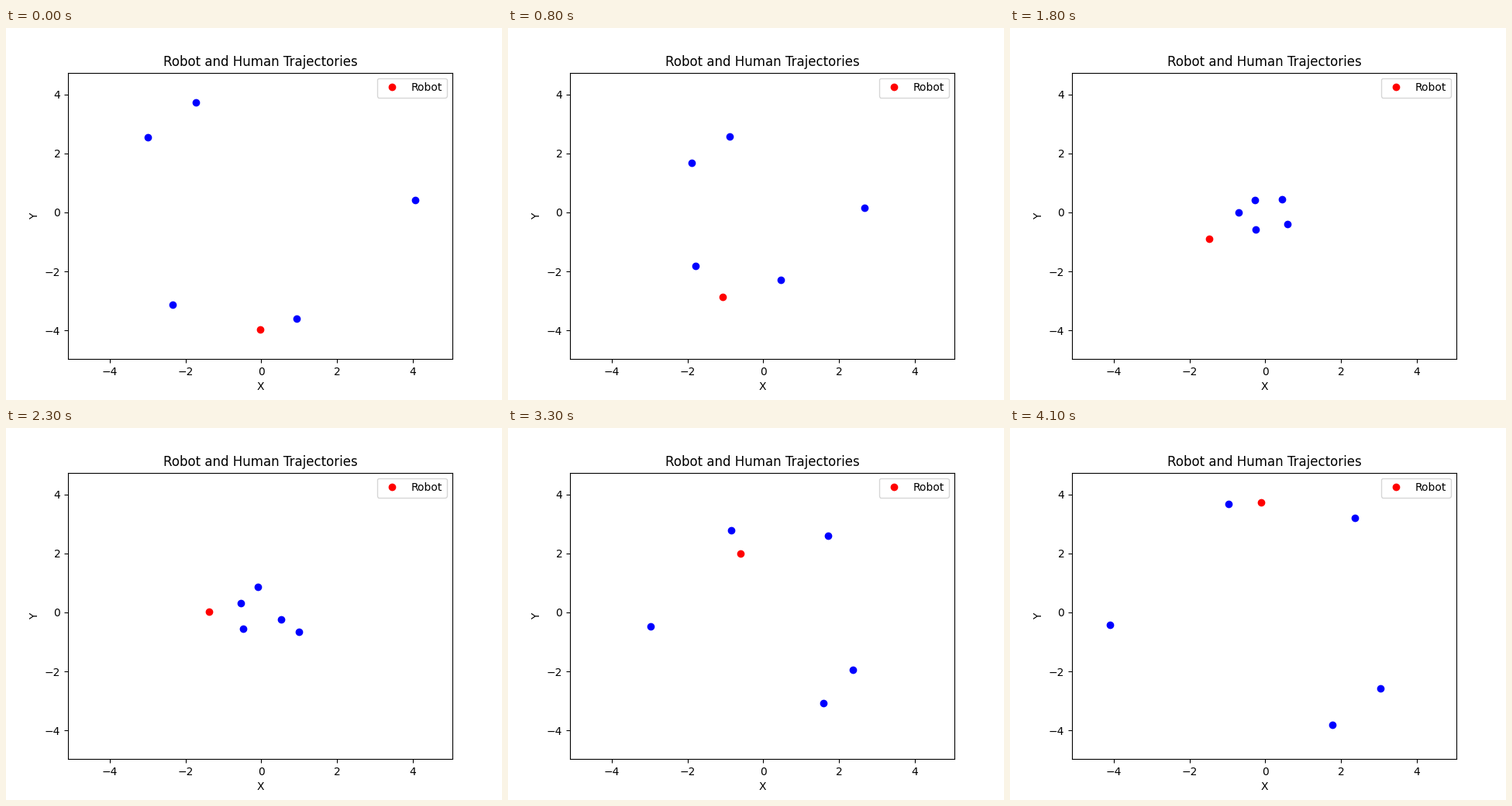
These frames come from a looping animation (640 by 480 pixels, 4.2 s). A matplotlib script:

```python
import numpy as np
import matplotlib.pyplot as plt
from matplotlib.animation import FuncAnimation

FRAMES = 42
DT = 0.25       # simulated time per frame
SLOW = 8        # frames of gentle start
CLEAR = 23      # frame at which the humans have passed each other

# home, distance past the centre when clear, swerve to the left, lateness
HUMANS = [
    ((-1.79, 3.89), 1.015, 0.627, 1.3),
    ((-3.12, 2.65), 0.554, 0.157, 1.5),
    ((4.23, 0.43), 0.532, 0.503, 2.1),
    ((-2.44, -3.28), 0.639, 0.588, 0.8),
    ((0.98, -3.78), 0.439, 0.444, 2.0),
]
# frame, x, y
ROBOT = [
    (0, -0.03, -3.97), (8, -1.07, -2.87), (15, -1.89, -1.47),
    (18, -1.48, -0.89), (23, -1.38, 0.02), (29, -0.87, 1.02),
]
ROBOT_GOAL = np.array([0, 4.1])


def glide(path, goal):
    """Run straight to the goal at unit speed, slowing within one unit."""
    path = list(path)
    while len(path) < FRAMES:
        way = goal - path[-1]
        path.append(path[-1] + DT * way / max(1, np.hypot(*way)))
    return np.array(path)


def human_path(home, passed, swerve, lateness):
    """Cross to the opposite side of the circle, keeping left."""
    home = np.array(home)
    radius = np.hypot(*home)
    ahead = -home / radius
    left = np.array([-ahead[1], ahead[0]])

    t = np.arange(CLEAR + 1)
    start = 0.175 - radius
    slow = np.minimum(t, SLOW)
    along = start + 0.145 * slow + 0.00375 * slow ** 2
    along += (passed - along[SLOW]) * (t - slow) / (CLEAR - SLOW)
    aside = swerve * np.sin(np.pi / 2 * t / CLEAR) ** lateness
    return glide(np.outer(along, ahead) + np.outer(aside, left), -home)


def robot_path():
    times, xs, ys = zip(*ROBOT)
    t = np.arange(times[-1] + 1)
    detour = np.column_stack([np.interp(t, times, xs),
                              np.interp(t, times, ys)])
    return glide(detour, ROBOT_GOAL)


human_paths = np.array([human_path(*human) for human in HUMANS])
robot_points = robot_path()

fig, ax = plt.subplots(figsize=(6.4, 4.8), dpi=100)
ax.set_xlim(-5.102, 5.045)
ax.set_ylim(-4.971, 4.735)
ax.set_title("Robot and Human Trajectories")
ax.set_xlabel("X")
ax.set_ylabel("Y")
robot, = ax.plot([], [], "ro", label="Robot")
humans, = ax.plot([], [], "bo")
ax.legend(loc="upper right")


def update(frame):
    robot.set_data(*robot_points[frame][:, None])
    humans.set_data(*human_paths[:, frame].T)
    return robot, humans


anim = FuncAnimation(fig, update, frames=FRAMES, interval=100, repeat=True)
plt.show()
```
